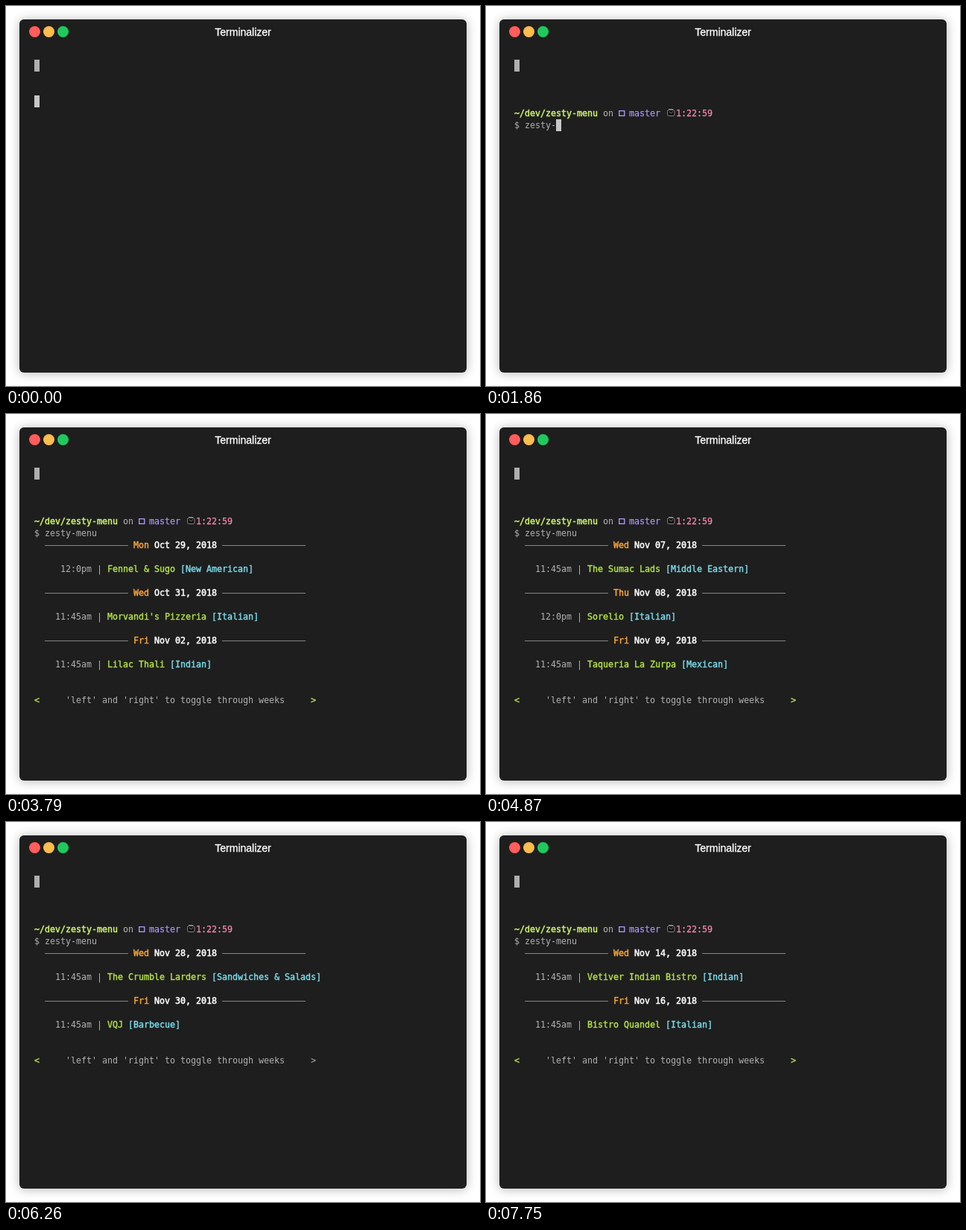
Animation of 636x510 px, one loop 8000 ms. Source, as an HTML page:

```html
<!DOCTYPE html>
<html lang="en">
<head>
<meta charset="utf-8">
<title>Terminal menu</title>
<style>
  html, body { margin: 0; width: 100%; height: 100%; overflow: hidden; background: #fff; }
  #win {
    position: absolute; left: 18px; top: 18px; width: 600px; height: 474px;
    border-radius: 6px; background: #1e1e1e;
    box-shadow: 0 1px 14px rgba(0, 0, 0, .3);
  }
  .dot { position: absolute; top: 9px; width: 15px; height: 15px; border-radius: 50%; }
  #title {
    position: absolute; left: 0; top: 9px; width: 100%; text-align: center; color: #fff;
    font: 14px/16px "Liberation Sans", Arial, sans-serif; -webkit-text-stroke: .3px;
  }
  #screen { position: absolute; left: 20px; top: 54px; }
  #screen * { position: absolute; }
  #screen span {
    font: 11.63px/16px "DejaVu Sans Mono", monospace; white-space: pre; color: #b2b2b2;
  }
  #screen .path { color: #c9f16e; -webkit-text-stroke: .5px; }
  #screen .branch { color: #ab92f0; -webkit-text-stroke: .25px; }
  #screen .clock { color: #f288ac; -webkit-text-stroke: .25px; }
  #screen .day { color: #fba23c; -webkit-text-stroke: .45px; }
  #screen .date { color: #fff; -webkit-text-stroke: .5px; }
  #screen .name { color: #b3e04a; -webkit-text-stroke: .4px; }
  #screen .kind { color: #7adcec; -webkit-text-stroke: .4px; }
  .block { width: 7px; height: 16px; }
  .rule { width: 112px; height: 1px; background: #858585; }
</style>
</head>
<body>
<div id="win">
  <div class="dot" style="left:13px;background:#ff5d5b"></div>
  <div class="dot" style="left:32px;background:#ffbc4f"></div>
  <div class="dot" style="left:51px;background:#1fc95e"></div>
  <div id="title">Terminalizer</div>
  <div id="screen"></div>
</div>
<script>
const LOOP = 8000, CW = 7, RH = 16;
const COMMAND = "zesty-menu";
const PROMPT_AT = 40, ENTER_AT = 3000, LOAD_AT = 3250;
const KEYS = [790, 950, 1210, 1340, 1630, 1860, 2150, 2300, 2440, 2700];

// day, date, time, place, cuisine
const WEEKS = [
  [["Mon", "Oct 29", "12:0pm", "Fennel & Sugo", "New American"],
   ["Wed", "Oct 31", "11:45am", "Morvandi's Pizzeria", "Italian"],
   ["Fri", "Nov 02", "11:45am", "Lilac Thali", "Indian"]],
  [["Wed", "Nov 07", "11:45am", "The Sumac Lads", "Middle Eastern"],
   ["Thu", "Nov 08", "12:0pm", "Sorelio", "Italian"],
   ["Fri", "Nov 09", "11:45am", "Taqueria La Zurpa", "Mexican"]],
  [["Wed", "Nov 14", "11:45am", "Vetiver Indian Bistro", "Indian"],
   ["Fri", "Nov 16", "11:45am", "Bistro Quandel", "Italian"]],
  [["Wed", "Nov 21", "11:45am", "Noodle Harrow", "Thai"]],
  [["Wed", "Nov 28", "11:45am", "The Crumble Larders", "Sandwiches & Salads"],
   ["Fri", "Nov 30", "11:45am", "VQJ", "Barbecue"]]
];
// time, week shown
const PAGES = [[3790, 0], [4870, 1], [5230, 2], [5700, 3], [6260, 4], [7290, 3], [7750, 2]];

const place = (col, row) => `left:${col * CW}px;top:${row * RH}px`;
const esc = s => s.replace(/&/g, "&amp;").replace(/</g, "&lt;");
const text = (col, row, s, cls = "") =>
  `<span class="${cls}" style="${place(col, row)}">${esc(s)}</span>`;
const block = (col, row, color) =>
  `<div class="block" style="${place(col, row)};background:${color}"></div>`;
const rule = (col, row) => `<div class="rule" style="${place(col, row + .5)}"></div>`;

const ICONS = `<svg width="100" height="16" style="left:136px;top:64px" fill="none">
  <rect x="4.7" y="4.7" width="7" height="6.6" stroke="#ab92f0" stroke-width="1.4"/>
  <g stroke="#858580">
    <path d="M71 2.5H77"/>
    <rect x="69.5" y="3.5" width="9.5" height="8" rx="2" fill="#111"/>
    <path d="M71.5 5.5L74.3 7.7L77 5.5" stroke-width=".9"/>
  </g></svg>`;

function prompt(typed) {
  return text(0, 4, "~/dev/zesty-menu", "path") + text(17, 4, "on") + ICONS +
    text(22, 4, "master", "branch") + text(31, 4, "1:22:59", "clock") +
    text(0, 5, "$ " + COMMAND.slice(0, typed));
}

function menu(index) {
  const days = WEEKS[index];
  const rows = days.map(([day, date, time, name, kind], i) => {
    const row = 6 + i * 4;
    return rule(2, row) + text(19, row, day, "day") +
      text(23, row, date + ", 2018", "date") + rule(36, row) +
      text(4, row + 2, time.padStart(7) + " |") + text(14, row + 2, name, "name") +
      text(15 + name.length, row + 2, `[${kind}]`, "kind");
  });
  const foot = 7 + days.length * 4;
  const last = index === WEEKS.length - 1;
  return rows.join("") + text(0, foot, "<", "name") +
    text(6, foot, "'left' and 'right' to toggle through weeks") +
    text(53, foot, ">", last ? "" : "name");
}

function view(t) {
  let html = block(0, 0, "#aeaeae");
  const cursor = (col, row) => block(col, row, "#c7c7c7");
  if (t < PROMPT_AT) return html + cursor(0, 3);
  const typed = KEYS.filter(k => k <= t).length;
  html += prompt(typed);
  if (t < ENTER_AT) return html + cursor(2 + typed, 5);
  if (t < LOAD_AT) return html + cursor(0, 6);
  const page = PAGES.filter(p => p[0] <= t).pop();
  return page ? html + menu(page[1]) : html;
}

const screenEl = document.getElementById("screen");
const start = performance.now();
let shown = "";
function tick() {
  const html = view((performance.now() - start) % LOOP);
  if (html !== shown) screenEl.innerHTML = shown = html;
  requestAnimationFrame(tick);
}
tick();
</script>
</body>
</html>
```
